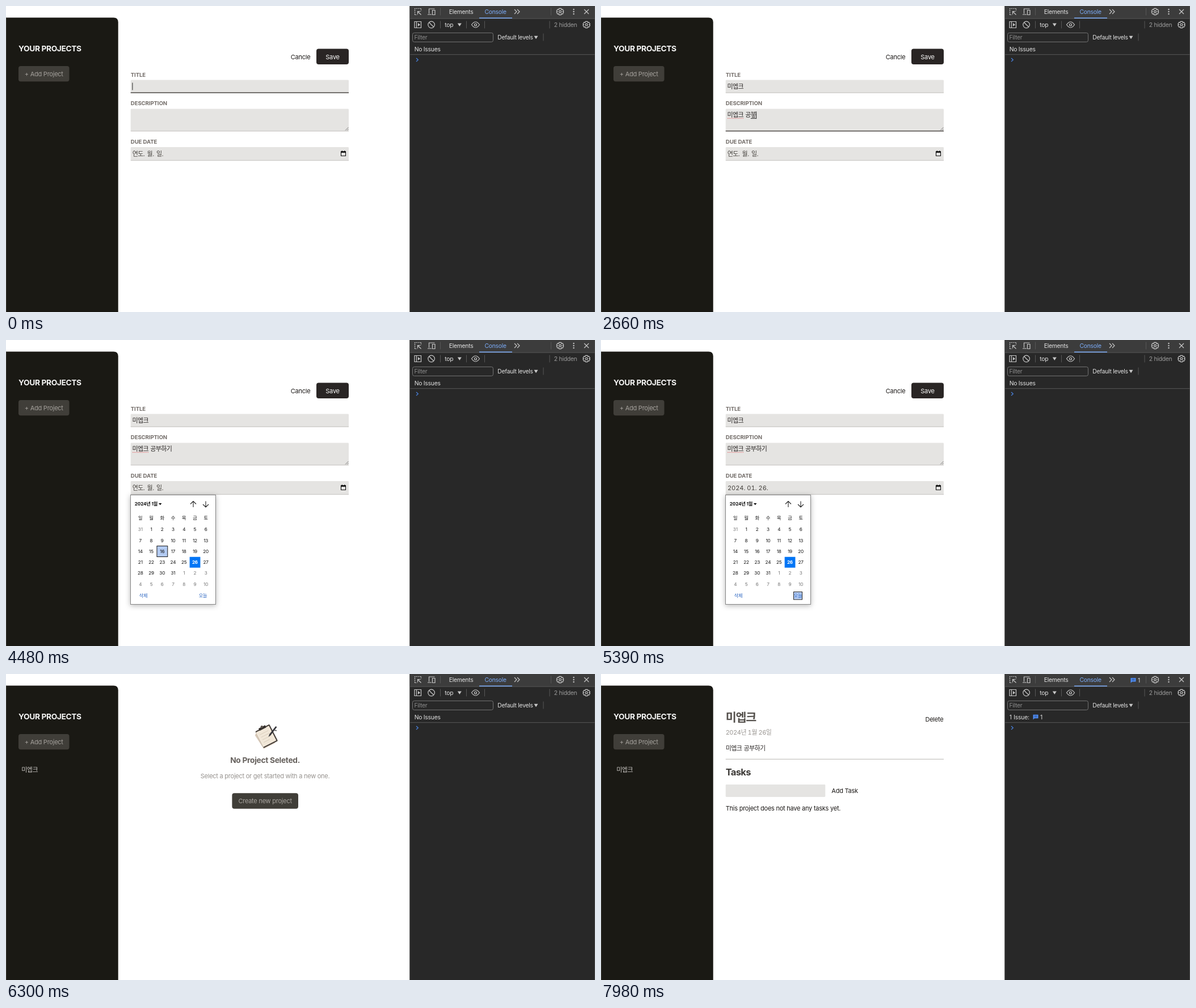
An HTML page that plays this animation: 1038 px wide and 540 px high, repeating every 8000 ms.

```html
<!DOCTYPE html>
<html lang="ko">
<head>
<meta charset="utf-8">
<title>Project planner</title>
<style>
html, body { margin: 0; width: 100%; height: 100%; overflow: hidden; background: #fff; }
svg { display: block; width: 100vw; height: 100vh; }
text { font: 11px Inter, "Noto Sans CJK KR", "Noto Sans CJK JP", sans-serif; letter-spacing: -.022em; fill: #1c1917; white-space: pre; }
.ko { letter-spacing: -.57px; word-spacing: .6px; }
.head { font-size: 13.75px; font-weight: 700; }
.label { font-size: 9.625px; font-weight: 700; fill: #736d69; letter-spacing: -.01em; }
.mid { text-anchor: middle; }
.tool text { font-size: 10.3px; fill: #e3e3e3; }
.icon { fill: none; stroke: #c7c7c7; stroke-width: 1.2; }
.field { fill: #e5e4e2; }
.edge { fill: #cfcdcb; }
.focus { fill: #4a4643; }
.cal text { font-size: 8.2px; fill: #111; text-anchor: middle; }
.cal .dim { fill: #757575; }
.cal .link { fill: #2a64c0; letter-spacing: -.4px; }
.cal { filter: drop-shadow(0 2px 5px rgba(0,0,0,.28)); }
.cell { fill: #b3cbf3; stroke: #1a1a1a; }
</style>
</head>
<body>
<svg viewBox="0 0 1038 540" preserveAspectRatio="none">
  <defs>
    <g id="gear" class="icon">
      <path d="M-1.8-5.6h3.6l.6 2 2-.6 1.8 3-1.5 1.2 1.5 1.2-1.8 3-2-.6-.6 2h-3.6l-.6-2-2 .6-1.8-3 1.5-1.2-1.5-1.2 1.8-3 2 .6z"/>
      <circle r="1.9"/>
    </g>
    <g id="bubble">
      <path d="M-4.5-4h9v6.5h-6.5l-2.5 2.2z" fill="#4f8df5"/>
      <path d="M-2.5-2h5M-2.5 0h5" stroke="#28406b" stroke-width=".8"/>
    </g>
    <path id="down" d="M-3.5-2.5h7l-3.5 5.5z" fill="#c7c7c7"/>
  </defs>

  <!-- sidebar -->
  <path d="M0 20.4H189.5q8.2 0 8.2 8.2V540H0z" fill="#1a1914"/>
  <path d="M.4 21V540" stroke="#4a4945" stroke-width=".8"/>
  <text class="head" x="22" y="79.6" style="fill:#f5f5f4;letter-spacing:-.028em">YOUR PROJECTS</text>
  <rect x="22" y="106" width="89.5" height="27.3" rx="4" fill="#403e39"/>
  <text x="32.8" y="123.8" style="fill:#a5a29d">+ Add Project</text>
  <g data-t="6300 8000">
    <rect data-t="7210 7980" x="22" y="158" width="154" height="22" rx="1.5" fill="#2b2926"/>
    <text class="ko" x="27.3" y="172.8" style="fill:#c9c6c3">미엡크</text>
  </g>

  <!-- form -->
  <g data-t="0 6300">
    <text x="501.7" y="93.7">Cancle</text>
    <rect x="547" y="75.5" width="57" height="27.5" rx="4" fill="#292524"/>
    <rect data-t="6020 6300" x="547" y="75.5" width="57" height="27.5" rx="4" fill="#0c0a09"/>
    <text x="563.3" y="93.7" style="fill:#fafaf9">Save</text>
    <text class="label" x="219.8" y="124.5">TITLE</text>
    <text class="label" x="219.8" y="175.3">DESCRIPTION</text>
    <text class="label" x="219.8" y="242.7">DUE DATE</text>
    <rect class="field" x="219.7" y="130.6" width="384.3" height="23" rx="1.4"/>
    <rect class="field" x="219.7" y="181.5" width="384.3" height="39.7" rx="1.4"/>
    <rect class="field" x="219.7" y="249" width="384.3" height="24" rx="1.4"/>
    <rect class="edge" x="219.7" y="152.3" width="384.3" height="1.4"/>
    <rect class="edge" x="219.7" y="219.9" width="384.3" height="1.4"/>
    <rect class="edge" x="219.7" y="271.8" width="384.3" height="1.4"/>
    <rect class="focus" data-t="0 1120" x="219.7" y="152.3" width="384.3" height="1.4"/>
    <rect class="focus" data-t="1120 3990" x="219.7" y="219.9" width="384.3" height="1.4"/>
    <path d="M598 219.5l5.5-5.5M601 219.5l2.5-2.5" stroke="#666" stroke-width=".8"/>
    <path data-t="2170 6300" d="M223 198.2h28" stroke="#e0575c" stroke-width="1.1" stroke-dasharray="1.4 1.3"/>
    <g id="typed"></g>
    <text data-t="0 5390" class="ko" x="222.7" y="264.6" style="fill:#44403c;word-spacing:1.7px">연도. 월. 일.</text>
    <text data-t="5390 6300" x="222.9" y="264.6" style="fill:#44403c;letter-spacing:0;font-feature-settings:'tnum'">2024. 01. 26.</text>
    <path d="M590.5 257h8v7.5h-8zM592.3 255.2v2M596.7 255.2v2" fill="none" stroke="#111" stroke-width="1.1"/>
    <path d="M590 256.5h9v2.3h-9z"/>
  </g>

  <!-- date picker -->
  <g data-t="4060 5460">
    <g class="cal" id="cal">
      <rect x="219.5" y="273.5" width="150" height="193" fill="#fff" stroke="#858585"/>
      <text x="247" y="292" style="font-weight:700">2024년 1월</text>
      <path d="M269 288h5.5l-2.75 3.2z"/>
      <path d="M330 295v-10.5m-5 5l5-5 5 5M352 284.5v10.5m-5-5l5 5 5-5" fill="none" stroke="#222" stroke-width="1.1"/>
      <text class="link" x="242" y="454.4">삭제</text>
      <rect data-t="5180 5460" x="339.5" y="444.5" width="15" height="13.5" fill="#b8cff5"/>
      <rect data-t="5250 5460" x="339.5" y="444.5" width="15" height="13.5" fill="none" stroke="#222"/>
      <text class="link" x="347" y="454.4">오늘</text>
    </g>
  </g>

  <!-- nothing selected -->
  <g data-t="6300 7630">
    <g transform="translate(458.5 109.5) rotate(-27)">
      <path d="M-17-10l4-3v28l22 1v2h-23z" fill="#d8c9b8"/>
      <rect x="-13.5" y="-16" width="28" height="33" rx="1.5" fill="#423b36"/>
      <rect x="-13.5" y="-14" width="26" height="29" fill="#f1e7d8"/>
      <path d="M-9-7h17M-9-2h17M-9 3h17M-9 8h12" stroke="#d6c9b8" stroke-width=".8"/>
      <path d="M-6-18h13v4.500h-13z" fill="#35302d"/>
      <circle cx=".5" cy="-18" r="2.2" fill="#5c544e"/>
    </g>
    <path d="M477.5 93.5l-11 14.500-4 3 1.7-4.700 11-14z" fill="#35353a"/>
    <path d="M472 99l5 1" stroke="#555" stroke-width="1.5"/>
    <text class="head mid" x="456.6" y="156.5" style="fill:#66615d">No Project Seleted.</text>
    <text class="mid" x="456.6" y="184.2" style="fill:#96928e">Select a project or get started with a new one.</text>
    <rect x="398.4" y="210.2" width="116.6" height="27.5" rx="4" fill="#403e38"/>
    <rect data-t="6790 7000" x="398.4" y="210.2" width="116.6" height="27.5" rx="4" fill="#57534e"/>
    <text class="mid" x="456.6" y="228" style="fill:#aaa6a1">Create new project</text>
    <text data-t="6790 7000" class="mid" x="456.6" y="228" style="fill:#f5f5f4">Create new project</text>
  </g>

  <!-- project page -->
  <g data-t="7630 8000">
    <text x="219.7" y="84.2" style="font-size:20.6px;font-weight:700;letter-spacing:-1.15px;fill:#55514d">미엡크</text>
    <text x="571.5" y="83.7">Delete</text>
    <text x="219.7" y="107.3" style="fill:#9a9692;letter-spacing:-.45px;font-feature-settings:'tnum'">2024년 1월 26일</text>
    <text class="ko" x="219.7" y="134.7" style="fill:#292524">미엡크 공부하기</text>
    <rect x="219.7" y="149.7" width="384.3" height="1.4" fill="#cbc9c7"/>
    <text x="219.7" y="179.4" style="font-size:16.5px;font-weight:700;letter-spacing:-.04em;fill:#3d3a37">Tasks</text>
    <rect class="field" x="219.7" y="195" width="175.6" height="22" rx="1.4"/>
    <text x="406.3" y="210.3">Add Task</text>
    <text x="219.7" y="240.7">This project does not have any tasks yet.</text>
  </g>

  <!-- developer tools -->
  <g class="tool">
    <rect x="711.5" width="327" height="540" fill="#282828"/>
    <rect x="711.5" width="327" height="22" fill="#3c3c3c"/>
    <path d="M711.7 0v540M1037.700 0v540" stroke="#505050"/>
    <path d="M712 22.2h326M712 85.7h326M765.5 3.5v13M960.5 3.5v13M765.5 26.5v13M811.5 26.5v13M843.5 26.5v13M958 26.5v13M947 48.5v13" stroke="#575757"/>
    <path d="M834 21.2h58" stroke="#7cacf8" stroke-width="1.6"/>
    <g class="icon">
      <path d="M720.5 15.5v-11h11M720.5 15.5h4M731.5 4.5v4" stroke-dasharray="2 1.2"/>
      <path d="M731.5 15.5l-6-6m0 5v-5h5"/>
      <path d="M745.5 13.5v-8.5h10M743 15h7M751.5 7.5h4.5v8h-4.5z"/>
      <path d="M896 6l4 4-4 4M901 6l4 4-4 4"/>
      <path d="M1019 6l8 8m0-8l-8 8"/>
      <path d="M720 27.5h11.5v11h-11.5zM723.5 27.5v11"/>
      <circle cx="749.6" cy="33" r="5.8"/><path d="M745.5 29l8.2 8"/>
      <path d="M820.5 33q7-10 14 0q-7 10-14 0z"/><circle cx="827.5" cy="33" r="2"/>
    </g>
    <path d="M726 30l4 3-4 3z" fill="#c7c7c7"/>
    <g fill="#c7c7c7"><circle cx="1000.5" cy="6" r="1.2"/><circle cx="1000.5" cy="10" r="1.2"/><circle cx="1000.5" cy="14" r="1.2"/></g>
    <use href="#gear" x="976.5" y="10"/><use href="#gear" x="1023" y="33"/>
    <use href="#down" x="799.3" y="33"/><use href="#down" x="934" y="55.2"/>
    <text x="780.8" y="13.8">Elements</text>
    <text x="843.4" y="13.8" style="fill:#7cacf8">Console</text>
    <text x="773.3" y="36.8">top</text>
    <text x="965.8" y="36.8" style="fill:#9a9a9a">2 hidden</text>
    <rect x="716.5" y="47.4" width="142" height="16" rx="3" fill="none" stroke="#757575"/>
    <text x="719.5" y="59.4" style="fill:#8c8c8c">Filter</text>
    <text x="866.3" y="59.4">Default levels</text>
    <path d="M723 92l3.3 3-3.3 3" fill="none" stroke="#4a83e0" stroke-width="1.2"/>
    <text data-t="0 7770" x="719.7" y="79.8">No Issues</text>
    <g data-t="7700 8000"><use href="#bubble" x="938" y="11"/><text x="946" y="14.8">1</text></g>
    <g data-t="7770 8000">
      <text x="719.7" y="79.8" style="word-spacing:1px">1 Issue:</text><use href="#bubble" x="766" y="75.8"/><text x="774" y="79.8">1</text>
    </g>
  </g>
</svg>
<script>
const LOOP = 8000, $ = id => document.getElementById(id);

function add(parent, tag, attrs, text) {
  const el = document.createElementNS('http://www.w3.org/2000/svg', tag);
  for (const k in attrs) el.setAttribute(k, attrs[k]);
  if (text) el.textContent = text;
  parent.append(el);
  return el;
}

// Calendar: Sunday 31 December 2023 is the first cell
const cal = $('cal');
const colX = i => 236.8 + 19.23 * (i % 7);
const rowY = i => 334.5 + 19.25 * Math.floor(i / 7);
const cell = (i, attrs) => add(cal, 'rect',
  {x: colX(i) - 9.3, y: rowY(i) - 9.5, width: 18.8, height: 19, ...attrs});

[...'일월화수목금토'].forEach((d, i) => add(cal, 'text', {x: colX(i), y: 317.4}, d));
cell(26, {fill: '#0075f5'});
[[16, 4480, 4550], [30, 4550, 4620], [38, 4620, 4690]].forEach(([i, a, b]) =>
  cell(i, {class: 'cell', 'data-t': a + ' ' + b}));
for (let i = 0; i < 42; i++) {
  const day = new Date(2023, 11, 31 + i);
  const el = add(cal, 'text', {x: colX(i), y: rowY(i) + 2.9}, String(day.getDate()));
  if (day.getMonth() !== 0) el.setAttribute('class', 'dim');
  if (i === 26) el.style.cssText = 'fill:#fff;font-weight:700';
}

// Typing, one entry per keystroke
function field(y, from, to, blink, keys) {
  const box = $('typed'), x0 = 222.4;
  const label = add(box, 'text', {class: 'ko', x: x0, y, style: 'fill:#292524'});
  const line = add(box, 'rect', {y: y + 1.6, width: 9.2, height: 1, fill: '#222'});
  const caret = add(box, 'rect', {y: y - 10.2, width: 1, height: 13, fill: '#222'});
  return t => {
    let text = '';
    for (const [at, s] of keys) if (t >= at) text = s;
    if (label.textContent !== text) label.textContent = text;
    let end = x0;
    for (const c of text) end += c === ' ' ? 3 : 9.55;
    const active = t >= from && t < to;
    caret.setAttribute('x', end);
    line.setAttribute('x', end - 9.3);
    caret.style.display = active && t < blink ? '' : 'none';
    line.style.display = active && text && !text.endsWith(' ') ? '' : 'none';
  };
}
const fields = [
  field(145.6, 0, 1120, 1120, [[210, 'ㅁ'], [280, '미'], [350, '밍'], [490, '미에'],
    [560, '미엡'], [770, '미엡ㅋ'], [840, '미엡크']]),
  field(196.3, 1120, 3990, 3430, [[1400, '미'], [1540, '밍'], [1680, '미에'], [1750, '미엡'],
    [1960, '미엡ㅋ'], [2030, '미엡크'], [2170, '미엡크 '], [2240, '미엡크 ㄱ'],
    [2310, '미엡크 고'], [2380, '미엡크 공'], [2520, '미엡크 공ㅂ'], [2590, '미엡크 공부'],
    [2660, '미엡크 공붛'], [2800, '미엡크 공부하'], [2870, '미엡크 공부학'], [2940, '미엡크 공부하기']])
];

// data-t holds the start and end of an element's visible time
const timed = [...document.querySelectorAll('[data-t]')].map(el => [el, ...el.dataset.t.split(' ').map(Number)]);

function draw(now) {
  const t = now % LOOP;
  for (const [el, a, b] of timed) el.style.display = t >= a && t < b ? '' : 'none';
  for (const f of fields) f(t);
}
const start = performance.now();
function tick() {
  draw(performance.now() - start);
  requestAnimationFrame(tick);
}
tick();
</script>
</body>
</html>
```
